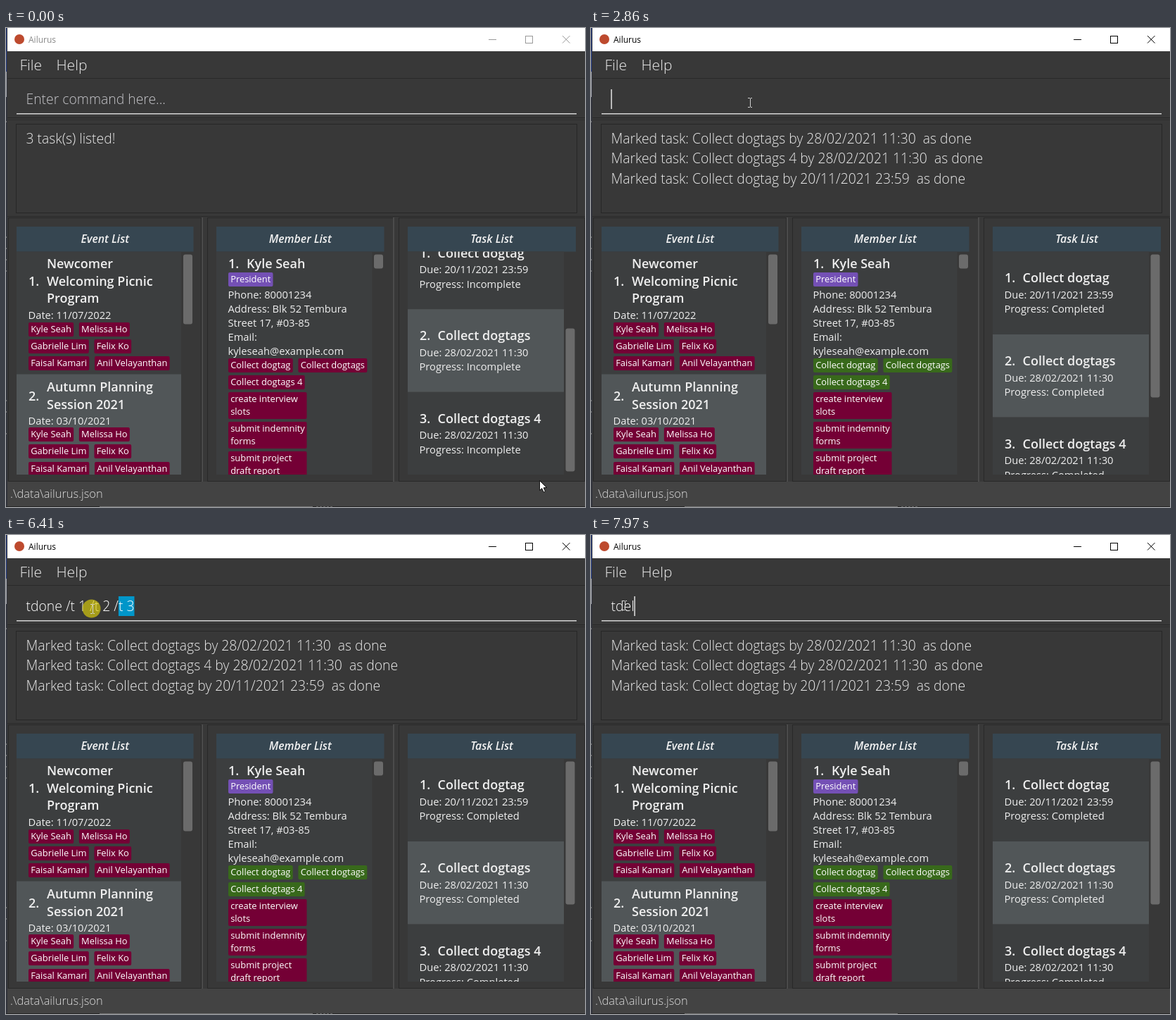
An HTML page with a canvas that plays this animation: 823x680 px, repeating every 8 s.

```html
<!DOCTYPE html>
<html lang="en">
<head>
<meta charset="utf-8">
<title>Task manager</title>
<style>
  html, body { margin: 0; width: 100%; height: 100%; overflow: hidden; background: #383838; }
  canvas { display: block; }
</style>
</head>
<body>
<canvas id="stage" width="823" height="680"></canvas>
<script>
const ctx = document.getElementById('stage').getContext('2d');
const LOOP = 8000;
const font = (weight, size) => `${weight} ${size}px "Open Sans", "Noto Sans", sans-serif`;
const F = {
  bar: font(400, 12),
  menu: font(300, 21),
  command: font(300, 19.37),
  status: font(300, 16.4),
  head: font('italic 600', 15.8),
  title: font(600, 18),
  body: font(400, 14.7),
  tag: font(400, 12.9)
};
const RED = '#740035', GREEN = '#38691b', PURPLE = '#7450b5';
const ROW_EVEN = '#3c3e3f', ROW_ODD = '#515658';
const COMMAND = 'tdone /t 1 /t 2 /t 3';
const TEXT_X = 28.5, DONE_AT = 2860, FOCUS_AT = 450;

// [time, text, caret visible]
const FIELD = [
  [0, '', 0], [FOCUS_AT, '', 1],
  [1000, COMMAND, 1], [1450, COMMAND, 0], [2000, COMMAND, 1], [2460, COMMAND, 0],
  [DONE_AT, '', 1], [3210, '', 0], [3670, '', 1], [4180, '', 0], [4640, '', 1], [5170, '', 0],
  [5450, COMMAND, 1], [5950, COMMAND, 0],
  [7110, 't', 1], [7300, 'td', 1], [7690, 'tde', 1], [7900, 'tdel', 1]
];

// [time, x, y] of the pointer
const POINTER = [
  [0, 758, 643], [70, 758, 643], [150, 690, 570], [230, 500, 370], [310, 300, 175], [380, 224, 104],
  [1650, 224, 104], [1650, 225, 105], [1800, 225, 105], [1800, 226, 106],
  [3670, 226, 106], [3670, 227, 106], [4310, 227, 106], [4310, 226, 106],
  [5250, 226, 106], [5600, 215, 105], [6200, 187, 105], [6270, 184, 105], [6340, 160, 105],
  [6410, 123, 105], [6480, 75, 102], [6550, 42, 99], [6620, 25, 98], [6690, 23, 98],
  [6850, 23, 98], [7090, 48, 100], [LOOP, 48, 100]
];
const PRESSES = [[380, 530], [6200, 6880]];
const DRAG = [6270, 7110];

const during = ([from, to], t) => t >= from && t < to;

function pointerAt(t) {
  const i = POINTER.findIndex(key => key[0] > t);
  if (i < 1) return POINTER[POINTER.length - 1].slice(1);
  const [t0, x0, y0] = POINTER[i - 1], [t1, x1, y1] = POINTER[i];
  const k = (t - t0) / (t1 - t0);
  return [x0 + (x1 - x0) * k, y0 + (y1 - y0) * k];
}

function rect(x, y, w, h, color) {
  ctx.fillStyle = color;
  ctx.fillRect(x, y, w, h);
}

function round(x, y, w, h, r, color) {
  ctx.fillStyle = color;
  ctx.beginPath();
  ctx.roundRect(x, y, w, h, r);
  ctx.fill();
}

function frame(x, y, w, h, color) {
  ctx.strokeStyle = color;
  ctx.lineWidth = 1;
  ctx.strokeRect(x + .5, y + .5, w - 1, h - 1);
}

// Baselines sit on whole pixels to keep the letters crisp.
function text(str, x, y, face, color = '#efefef', align = 'left') {
  ctx.font = face;
  ctx.fillStyle = color;
  ctx.textAlign = align;
  ctx.fillText(str, x, Math.round(y));
}

function widthOf(str, face) {
  ctx.font = face;
  return ctx.measureText(str).width;
}

function clipped(x, y, w, h, draw) {
  ctx.save();
  ctx.beginPath();
  ctx.rect(x, y, w, h);
  ctx.clip();
  draw();
  ctx.restore();
}

function tagRow(labels, x, y, color) {
  y = Math.round(y);
  for (const label of labels) {
    const w = widthOf(label, F.tag) + 6.5;
    round(x, y, w, 20, 2, color);
    text(label, x + 3.2, y + 14, F.tag, '#fff');
    x += w + 7.7;
  }
}

function titleBar(active) {
  const ink = active ? '#000' : '#999';
  rect(0, 0, 823, 33, '#fff');
  ctx.fillStyle = '#bd4a2e';
  ctx.beginPath();
  ctx.arc(19, 16, 7, 0, 7);
  ctx.fill();
  text('Ailurus', 32, 21, F.bar, active ? '#000' : '#888');
  rect(686, 16, 11, 1, ink);
  frame(738, 11, 11, 11, ink);
  ctx.beginPath();
  ctx.moveTo(791, 11); ctx.lineTo(801.5, 21.5);
  ctx.moveTo(801.5, 11); ctx.lineTo(791, 21.5);
  ctx.stroke();
}

function chrome(t) {
  rect(0, 0, 823, 680, '#383838');
  titleBar(t >= FOCUS_AT);
  text('File', 19.5, 60, F.menu, '#ececec');
  text('Help', 71.5, 60, F.menu, '#ececec');
  rect(2, 71, 821, 1, '#292929');
  rect(2, 127, 821, 1, '#292929');
  rect(2, 130, 821, 1, '#2f2f2f');
  rect(15, 121, 796, 1.5, '#d4d4d4');
  frame(14, 136, 798, 127, '#272727');
  rect(2, 267, 821, 1, '#2b2b2b');
  for (const [x, w] of [[3, 275], [286, 265], [558, 265]]) frame(x, 269, w, 375, '#292929');
  for (const x of [278, 550]) rect(x, 269, 2, 375, '#4b4b4b');
  rect(2, 644, 821, 36, '#434343');
  text('.\\data\\ailurus.json', 6, 667, F.status, '#dedede');
  windowBehind(t);
}

function windowBehind(t) {
  rect(0, 0, 2, 680, '#30323a');
  rect(0, 0, 1, 62, '#2c4388');
  rect(0, 62, 1, 36, '#a4a6ac');
  for (const y of [132, 296, 312, 328, 344, 528, 544, 575]) rect(0, y, 1, 2, '#777');
  rect(0, 679, 823, 1, '#252525');
  rect(133, 679, 303, 1, '#707070');
  if (t < 7690) for (let x = 441; x < 464; x += 5) rect(x, 679, 3, 1, '#606060');
}

function results(done) {
  const lines = done ? [
    'Marked task: Collect dogtags by 28/02/2021 11:30  as done',
    'Marked task: Collect dogtags 4 by 28/02/2021 11:30  as done',
    'Marked task: Collect dogtag by 20/11/2021 23:59  as done'
  ] : ['3 task(s) listed!'];
  lines.forEach((line, i) => text(line, TEXT_X, 164 + i * 28.3, F.command, '#ebebeb'));
}

function list(title, x, headWidth, cellWidth, thumbY, thumbHeight, drawCells) {
  rect(x, 282, headWidth, 35.5, '#364651');
  text(title, x + headWidth / 2, 305, F.head, '#f2f2f2', 'center');
  rect(x, 317.5, cellWidth, 316.5, ROW_EVEN);
  round(x + headWidth - 14.5, thumbY, 13, thumbHeight, 3, '#6b6b6b');
  clipped(x, 317.5, cellWidth, 316.5, drawCells);
}

function eventCells() {
  const people = [['Kyle Seah', 'Melissa Ho'], ['Gabrielle Lim', 'Felix Ko'], ['Faisal Kamari', 'Anil Velayanthan']];
  const event = (number, numberY, lines, titleY, date, dateY) => {
    text(number, 32, numberY, F.title);
    lines.forEach((line, i) => text(line, 58, titleY + i * 24.6, F.title));
    text('Date: ' + date, 31.5, dateY, F.body);
    people.forEach((row, i) => tagRow(row, 32, dateY + 4.5 + i * 24.2, RED));
  };
  event('1.', 365.5, ['Newcomer', 'Welcoming Picnic', 'Program'], 341, '11/07/2022', 413.3);
  rect(15, 491.5, 234, 143, ROW_ODD);
  event('2.', 528.5, ['Autumn Planning', 'Session 2021'], 516, '03/10/2021', 562.6);
}

function memberCells(done) {
  text('1.', 316, 341, F.title);
  text('Kyle Seah', 342, 341, F.title);
  tagRow(['President'], 316, 347.3, PURPLE);
  ['Phone: 80001234', 'Address: Blk 52 Tembura', 'Street 17, #03-85', 'Email:', 'kyleseah@example.com']
    .forEach((line, i) => text(line, 315.5, 383.8 + i * 20.15, F.body));
  const color = done ? GREEN : RED;
  tagRow(['Collect dogtag', 'Collect dogtags'], 316, 469, color);
  tagRow(['Collect dogtags 4'], 316, 493, color);
  [['create interview', 'slots'], ['submit indemnity', 'forms'], ['submit project', 'draft report']]
    .forEach((lines, i) => {
      const y = 517 + i * 42;
      round(316, y, 111.5, 38, 2, RED);
      lines.forEach((line, j) => text(line, 319.2, y + 14 + j * 17.9, F.tag, '#fff'));
    });
}

function taskCells(done) {
  const tasks = [['Collect dogtag', '20/11/2021 23:59'], ['Collect dogtags', '28/02/2021 11:30'], ['Collect dogtags 4', '28/02/2021 11:30']];
  tasks.forEach(([name, due], i) => {
    const y = (done ? 317.4 : 281.6) + i * 117.6;
    rect(571, y, 222, 117.6, i % 2 ? ROW_ODD : ROW_EVEN);
    text(i + 1 + '.', 588, y + 44, F.title);
    text(name, 613.5, y + 44, F.title);
    text('Due: ' + due, 587.5, y + 66.6, F.body);
    text('Progress: ' + (done ? 'Completed' : 'Incomplete'), 587.5, y + 87, F.body);
  });
}

function commandField(t) {
  if (t < FOCUS_AT) {
    text('Enter command here...', TEXT_X, 108, F.command, '#c4c4c8');
    return;
  }
  const [, value, caret] = FIELD.filter(state => state[0] <= t).pop();
  const end = TEXT_X + widthOf(value, F.command);
  if (during(DRAG, t)) {
    // The highlight trails the pointer and snaps to letter edges.
    const x = pointerAt(t - 70)[0];
    const edges = [...value, ''].map((_, i) => TEXT_X + widthOf(value.slice(0, i), F.command));
    const start = edges.reduce((best, edge) => Math.abs(edge - x) < Math.abs(best - x) ? edge : best);
    rect(start, 87, end - start, 28, '#0096c9');
  }
  text(value, TEXT_X, 108, F.command, '#fff');
  if (caret) rect(end - .2, 87, 1.5, 28, '#e4e4e4');
}

function arrow(x, y) {
  ctx.beginPath();
  [[0, 0], [0, 14], [3.2, 11], [5.6, 16.4], [8, 15.4], [5.7, 10.2], [10, 10]]
    .forEach(([dx, dy]) => ctx.lineTo(x + .5 + dx, y - .5 + dy));
  ctx.closePath();
  ctx.fillStyle = '#fff';
  ctx.fill();
  ctx.strokeStyle = '#111';
  ctx.lineWidth = 1;
  ctx.stroke();
}

function beam(x, y) {
  x = Math.round(x);
  y = Math.round(y);
  const color = '#d0d0d0';
  rect(x, y - 6, 1, 12, color);
  for (const edge of [y - 7, y + 6]) {
    rect(x - 3, edge, 3, 1, color);
    rect(x + 1, edge, 2, 1, color);
  }
}

function pointer(t) {
  const [x, y] = pointerAt(t);
  if (PRESSES.some(press => during(press, t))) {
    ctx.fillStyle = 'rgba(222, 208, 10, .66)';
    ctx.beginPath();
    ctx.arc(x - 1.5, y - .5, 13, 0, 7);
    ctx.fill();
  }
  (y > 85 && y < 122 ? beam : arrow)(x, y);
}

function draw(t) {
  const done = t >= DONE_AT;
  chrome(t);
  results(done);
  list('Event List', 15, 251.5, 234, 321.5, 99, eventCells);
  list('Member List', 299, 238.5, 221.5, 321.5, 20, () => memberCells(done));
  list('Task List', 571, 239, 222, done ? 321.5 : 426.5, 203, () => taskCells(done));
  commandField(t);
  pointer(t);
}

let began;
function tick(now) {
  began ??= now;
  draw((now - began) % LOOP);
  requestAnimationFrame(tick);
}
draw(0);
requestAnimationFrame(tick);
</script>
</body>
</html>
```
